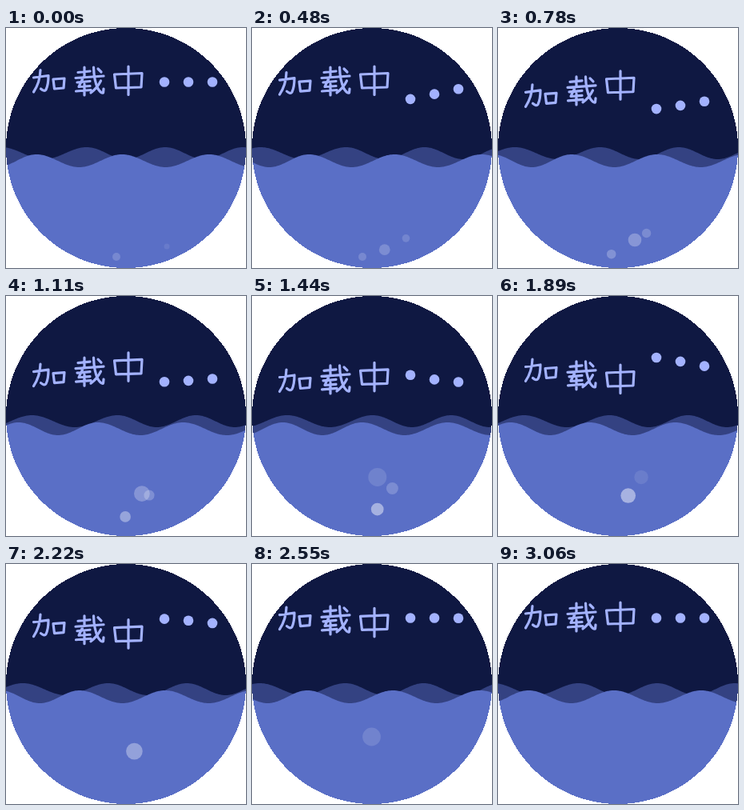
These frames come from a looping animation (300 px wide and 300 px high, 3120 ms). An HTML page with a canvas:

```html
<!DOCTYPE html>
<html lang="zh">
<head>
<meta charset="utf-8">
<title>加载中</title>
<style>
html, body { margin: 0; width: 100%; height: 100%; overflow: hidden; background: #fff; }
canvas { display: block; width: 300px; height: 300px; }
</style>
</head>
<body>
<canvas id="stage" width="300" height="300" role="img" aria-label="加载中…"></canvas>
<script>
const ctx = document.getElementById('stage').getContext('2d');
const SIZE = 300, LOOP = 3120, STEP = 30, SWING = 1500;
const BOB = 1200, LAG = 120, DROP = 40;

// Handwritten characters as brush strokes
const GLYPHS = [
  'M34.5 62L53 59.5Q53 71 50 77Q48 80 43.5 76M43 52.5Q42.5 68 34.5 80M59 64L73 63L72 75L60.5 76Z',
  'M90 55.5L105 54M98 49V61M87 62.5L122 60M109.5 49Q110 66 115 76Q119 82 121.5 81L122 76' +
  'M118.5 66Q114 75 106 81M115 51L119 55M89 68L105 66.5M96 63L91 73.5L105 72.5M98 70V84M87.5 79L106 77.5',
  'M135.5 58L170 56.5L169 74L137.5 75Z M153 48V83.5'
].map(d => new Path2D(d));

const BACK = { color: '#344282', crests: [-113, -6, 101, 199, 296, 394], top: 149, bottom: 164, travel: 52 };
const FRONT = { color: '#5a6fc6', crests: [-158, -61, 38, 145, 254, 362], top: 158, bottom: 174, travel: 103.5 };

// Each bubble follows one cubic curve between start and end
const BUBBLES = [
  { show: 0, start: 540, end: 2730, xs: [138, 146, 189, 139], ys: [286, 278, 251, 205], r: [5, 12], peak: .48 },
  { show: 90, start: 90, end: 1650, xs: [156, 168, 191, 140], ys: [284, 283, 246, 213], r: [5, 12.5], peak: .28 },
  { show: 0, start: 0, end: 2160, xs: [201, 193, 156, 188], ys: [273, 257, 246, 216], r: [3.5, 9.5], peak: .22 }
];

const clamp = v => Math.min(1, Math.max(0, v));
const lerp = (a, b, p) => a + (b - a) * p;

function cubic([a, b, c, d], u) {
  const v = 1 - u;
  return v * v * v * a + 3 * v * v * u * b + 3 * v * u * u * c + u * u * u * d;
}

function ease(x) {
  let lo = 0, hi = 1;
  for (let i = 0; i < 20; i++) {
    const mid = (lo + hi) / 2;
    if (cubic([0, .2, .5, 1], mid) < x) lo = mid; else hi = mid;
  }
  return cubic([0, .04, 1, 1], lo);
}

function bob(t, order) {
  const s = t - order * LAG;
  return DROP * (ease(clamp(s / BOB)) - ease(clamp(s / BOB - 1)));
}

// Hard-edged round window built from whole pixel rows
function roundWindow() {
  const path = new Path2D(), mid = SIZE / 2;
  for (let y = 0; y < SIZE; y++) {
    const half = Math.round(Math.sqrt(mid * mid - (y + .5 - mid) ** 2));
    path.rect(mid - half, y, half * 2, 1);
  }
  return path;
}
const porthole = roundWindow();

function disc(x, y, r) {
  ctx.beginPath();
  ctx.arc(x, y, r, 0, Math.PI * 2);
  ctx.fill();
}

function drawWave({ color, crests, top, bottom, travel }, swing) {
  const shift = travel * swing;
  ctx.fillStyle = color;
  ctx.beginPath();
  ctx.moveTo(0, SIZE);
  for (let x = 0; x <= SIZE; x++) {
    const at = x - shift;
    const i = crests.findIndex(c => c > at);
    const phase = (at - crests[i - 1]) / (crests[i] - crests[i - 1]);
    ctx.lineTo(x, lerp(bottom, top, (1 + Math.cos(phase * Math.PI * 2)) / 2));
  }
  ctx.lineTo(SIZE, SIZE);
  ctx.fill();
}

function drawBubble({ show, start, end, xs, ys, r, peak }, t) {
  if (t < show || t >= end) return;
  const p = clamp((t - start) / (end - start));
  const alpha = peak * Math.sin(Math.PI * lerp(.12, 1, p ** 1.3));
  ctx.fillStyle = `rgba(255,255,255,${alpha})`;
  disc(cubic(xs, p), cubic(ys, p), lerp(r[0], r[1], p));
}

function drawLabel(t) {
  ctx.fillStyle = ctx.strokeStyle = '#a3b2ff';
  ctx.lineWidth = 3.2;
  ctx.lineCap = ctx.lineJoin = 'round';
  GLYPHS.forEach((glyph, i) => {
    disc(198 + 30 * i, 67.5 + bob(t, i), 6.3);
    ctx.save();
    ctx.translate(0, bob(t, i + 3));
    ctx.stroke(glyph);
    ctx.restore();
  });
}

function draw(t) {
  const swing = clamp(1 - Math.abs(t - SWING) / SWING);
  ctx.clearRect(0, 0, SIZE, SIZE);
  ctx.save();
  ctx.clip(porthole);
  ctx.fillStyle = '#0f1842';
  ctx.fillRect(0, 0, SIZE, SIZE);
  drawWave(BACK, swing);
  drawWave(FRONT, swing);
  BUBBLES.forEach(b => drawBubble(b, t));
  drawLabel(t);
  ctx.restore();
}

const begin = performance.now();
function tick() {
  const t = (performance.now() - begin) % LOOP;
  draw(Math.floor(t / STEP) * STEP);
  requestAnimationFrame(tick);
}
tick();
</script>
</body>
</html>
```
